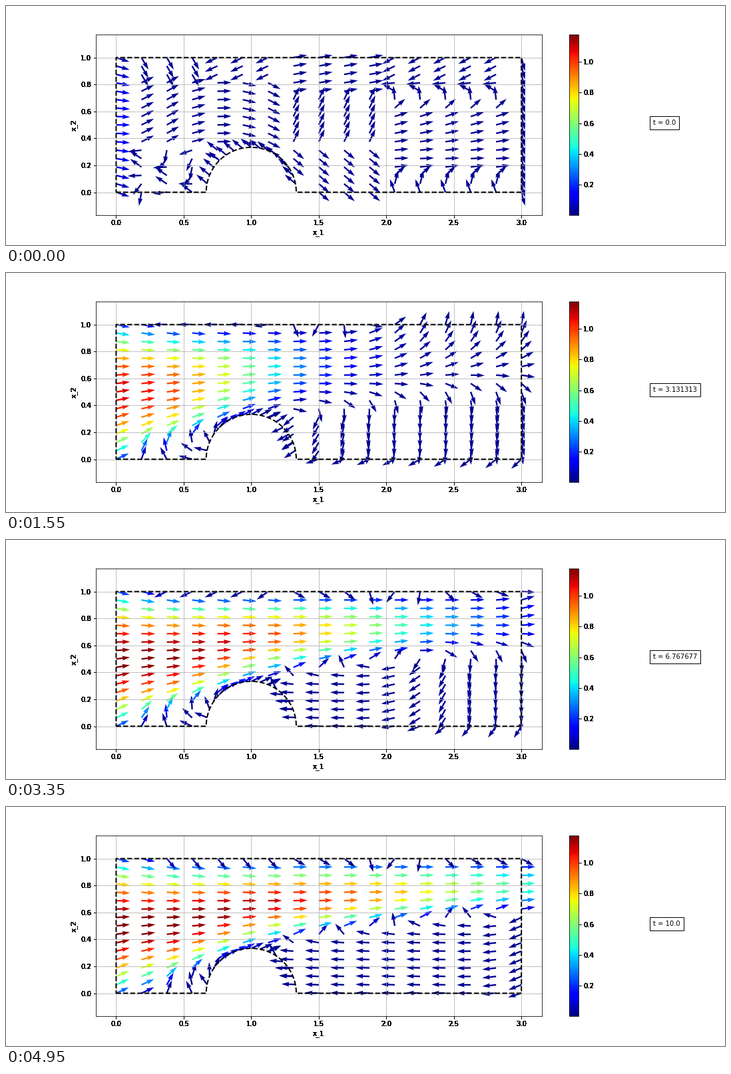
These frames come from a looping animation (1080x360 px, 5 s). A matplotlib script:

```python
import numpy as np
import matplotlib.pyplot as plt
from matplotlib.animation import FuncAnimation

FRAMES, STEP_MS = 100, 50
TIMES = np.linspace(0, 10, FRAMES, dtype=np.float32)
R = 1 / 3

plt.rcParams.update({"font.family": "DejaVu Sans", "font.size": 10})


def unit(deg):
    return np.exp(1j * np.radians(deg))


def sigmoid(v):
    return .5 + .5 * np.tanh(v / 2)


def mix(a, b, w):
    return (1 - w) * a + w * b


def nodes():
    gx, gy = np.meshgrid(np.linspace(0, 3, 17), np.linspace(0, 1, 17))
    gx, gy = gx.ravel(), gy.ravel()
    free = np.hypot(gx - 1, gy) > R
    a = np.pi * np.arange(1, 16) / 16
    return (np.r_[gx[free], 1 + R * np.cos(a)],
            np.r_[gy[free], R * np.sin(a)])


X, Y = nodes()
# lower and upper edge of the main stream
LOW = np.interp(X, [0, .375, .75, 1, 1.3, 1.9, 2.6, 3],
                [-.06, .03, .21, .32, .39, .48, .57, .59])
HIGH = 1 + .05 * np.exp(-X / .3)
ABOVE = np.clip(Y - LOW, 0, 1)
CEILING = Y > .99
SIDE = np.clip((X - 1.1) / .15, 0, 1)


def speed(t):
    peak = 1.17 * (1 - .9 * np.exp(-t / 1.35))
    reach = .05 + .4 * t ** .88
    power = 1.3 + 1.2 * np.tanh(t / 4)
    s = np.clip((Y - LOW) / (HIGH - LOW), 0, 1)
    profile = (4 * s * (1 - s)) ** (1.5 - .5 * np.exp(-X))
    return .02 + peak * np.exp(-(X / reach) ** power) * profile


def rest():
    """Nearly still fluid before the inflow builds up."""
    left = np.select([Y < .36, Y < .84],
                     [200 + 60 * np.sin(9 * X + 14 * Y), 35 - 75 * np.abs(X - .3)],
                     np.where(X > .65, 205, -60))
    middle = np.select([Y < .36, Y < .7], [-40, 65], 10)
    right = np.interp(Y, [0, .2, .6, .75, .85], [110, 0, 20, 150, 207])
    deg = np.select([X == 0, X == 3, np.hypot(X - 1, Y) < R + .01, X < 1.25, X < 1.9],
                    [-18 * np.abs(2 * Y - 1), -75, 140, left, middle], right)
    return unit(deg)


REST = rest()


def inflow(t):
    """Heading in front of and above the bump."""
    climb = 25 * np.exp(-((X - .72) / .25) ** 2) + 14 * np.exp(-((X - 1.05) / .2) ** 2)
    deg = (40 * (.65 - Y) * np.exp(-X / 1.5) + 14 * np.exp(-t / 2)
           + climb * np.exp(-ABOVE / .12))
    corner = np.exp(-(Y / .15) ** 2) * (X < .95)
    turn = 25 + 250 * np.clip(X - .2 * (t / 10) ** 4, 0, 1)
    deg = mix(deg, turn, corner)
    top = 180 + 130 * np.clip((t - 6) / 4, 0, 1)
    return unit(np.where(CEILING & (X > .25), top, deg))


def wake(t):
    """Heading behind the bump: stream, backflow and sinking fluid ahead."""
    tip = 1 + .32 * t
    ahead = sigmoid((X - tip) / .15)
    sinking = sigmoid((X - .55 - .26 * t) / .15)

    stream = 80 * ahead * ABOVE / (1 - LOW)
    stream += mix(30, -15, sinking) * np.exp(-ABOVE / .1)
    bend = 30 + 100 * np.exp(-((X - min(tip - .45, 2.1)) / .25) ** 2)
    stream -= CEILING * (1 - ahead) * bend * (t > 3)

    fan = 50 * np.clip(X - 2, 0, 1) * np.exp(-t / 3)
    floor = 100 * np.exp(-(Y / .04) ** 2) * np.exp(-t / 6)
    below = 178 + sinking * (87 + fan - floor)
    split = LOW - .12 * np.exp(-t / 2.5)
    return mix(unit(below), unit(stream), sigmoid((Y - split) / .03))


def heading(t):
    flow = mix(inflow(t), wake(t), SIDE)
    v = mix(flow, REST, np.exp(-(t / .5) ** 2))
    return v / np.maximum(np.abs(v), 1e-9)


def harden(img, dpi):
    """Give dark antialiased pixels full opacity."""
    img = np.array(img)
    dark = (img[..., :3].max(axis=-1) < .3) & (img[..., 3] > .03)
    img[..., 3][dark] = 1
    return img, 0, 0


fig, ax = plt.subplots(figsize=(15, 5), dpi=72, facecolor="white")
fig.subplots_adjust(left=.125, right=.9, bottom=.125, top=.88)

v0 = heading(0)
arrows = ax.quiver(X, Y, v0.real, v0.imag, speed(0), cmap="jet",
                   scale=32, width=.0035)
arrows.set_clim(.001, 1.178)
bar = fig.colorbar(arrows, ax=ax)

arc = np.linspace(np.pi, 0, 100)
ax.plot(np.r_[0, 1 + R * np.cos(arc), 3, 3, 0, 0],
        np.r_[0, R * np.sin(arc), 0, 1, 1, 0], "k--", lw=2)
ax.set(xlim=(-.15, 3.15), ylim=(-.17, 1.17), xlabel="x_1", ylabel="x_2")
ax.grid(True)
for axis in (ax.xaxis, ax.yaxis, bar.ax.yaxis):
    axis.set_agg_filter(harden)

clock = fig.text(.9, .503, "t = 0.0",
                 bbox=dict(facecolor="white", edgecolor="black", pad=5))


def update(i):
    t = TIMES[i]
    v = heading(float(t))
    arrows.set_UVC(v.real, v.imag, speed(float(t)))
    clock.set_text(f"t = {str(t)}")
    return arrows, clock


anim = FuncAnimation(fig, update, frames=FRAMES, interval=STEP_MS,
                     repeat=True, repeat_delay=0, blit=False)
plt.show()
```
